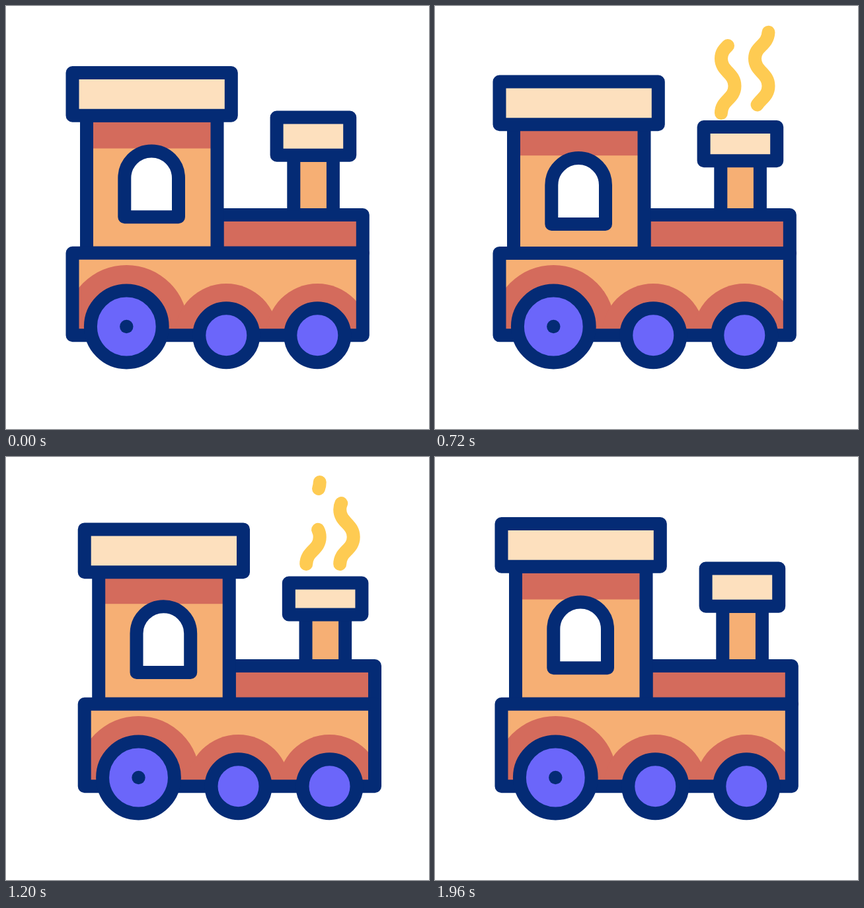
Recreate the animation shown at these times as an HTML page. Size 640 px wide and 640 px high, loop 2 s.

```html
<!DOCTYPE html>
<html lang="en">
<head>
<meta charset="utf-8">
<title>Toy train</title>
<style>
  html, body { margin: 0; height: 100%; overflow: hidden; background: #fff; }
  svg { display: block; width: 100%; height: 100%; }
  .line { stroke: #042b75; stroke-width: 20; stroke-linejoin: round; }
  .smoke { fill: none; stroke: #fecb52; stroke-width: 20; stroke-linecap: round; }
  .orange { fill: #f6af74; }
  .red { fill: #d46b5c; }
  .cream { fill: #fde0be; }
  .wheel { fill: #6b66fa; }
</style>
</head>
<body>
<svg viewBox="0 0 640 640">
  <clipPath id="hull"><rect x="100.5" y="373.8" width="439.3" height="124.4"/></clipPath>
  <g id="train">
    <g id="body">
      <path id="left" class="smoke" pathLength="100" d="M436 162C436 142 456.500 141 456.500 121S436 99 436 79.500S456.500 60 456.500 38"/>
      <path id="right" class="smoke" pathLength="100" d="M487 162C487 142 507.500 141 507.500 121S487 99 487 79.500S507.500 60 507.500 38"/>
      <rect class="line orange" x="435.3" y="226" width="59.6" height="90"/>
      <rect id="cap" class="line cream" x="409.6" width="110.600"/>
      <rect class="line red" x="319.5" y="316" width="220.3" height="57.8"/>
      <rect class="orange" x="122" y="166" width="197.5" height="208"/>
      <rect id="band" class="red" x="122" y="166" width="197.5"/>
      <rect class="line" fill="none" x="122" y="166" width="197.5" height="207.8"/>
      <path id="window" class="line" fill="#fff" d="M179.300 319.300V260.300a40.850 40.850 0 0 1 81.700 0V319.300Z"/>
      <rect id="roof" class="line cream" x="100.5" y="101" width="240.3" height="64.8"/>
      <g clip-path="url(#hull)">
        <rect class="orange" x="100" y="373" width="440" height="126"/>
        <g id="arches" class="red">
          <circle cx="182.3" cy="485" r="93"/>
          <circle cx="333.3" cy="498" r="78"/>
          <circle cx="471.3" cy="498" r="78"/>
        </g>
      </g>
      <rect class="line" fill="none" x="100.5" y="373.8" width="439.3" height="124.4"/>
    </g>
    <g class="line wheel">
      <circle cx="182.3" cy="485" r="54.4"/>
      <circle cx="333.3" cy="498.2" r="41"/>
      <circle cx="471.3" cy="498.2" r="41"/>
    </g>
    <circle cx="182.3" cy="485" r="10.2" fill="#042b75"/>
  </g>
</svg>
<script>
const el = id => document.getElementById(id);
const move = (id, x, y) => el(id).setAttribute('transform', `translate(${x} ${y})`);
const ease = u => (1 - Math.cos(Math.PI * Math.min(1, Math.max(0, u)))) / 2;

// Eased value between [time, value] keys
function keyed(t, keys) {
  let v = keys[0][1];
  for (let i = 1; i < keys.length; i++) {
    const [t0, a] = keys[i - 1], [t1, b] = keys[i];
    v += (b - a) * ease((t - t0) / (t1 - t0));
  }
  return v;
}

// Repeated dips between 200 and 1800 ms
const dip = (t, period) =>
  t < 200 || t > 1800 ? 0 : Math.sin(Math.PI * (t - 200) / period) ** 2;

const SWAY = [[140, 0], [495, -13], [1091, 19], [1926, 0]];
const BOB = [[180, 0], [440, 4.6], [700, 0], [920, 5.6], [1180, 0], [1620, 9], [1800, 0]];
const PUFF = 640, DRAW = 570, FADE = 420;

// Each wisp grows from the chimney, then its tail follows; two puffs per loop
function smoke(id, t, start) {
  const dashes = [];
  let pos = 0;
  for (const s of [start + PUFF, start]) {
    const head = 100 * ease((t - s) / DRAW);
    const tail = 100 * ease((t - s - FADE) / DRAW);
    if (head - tail > 0.01) {
      dashes.push([tail, head]);
    }
  }
  const path = el(id);
  path.style.display = dashes.length ? '' : 'none';
  if (!dashes.length) return;
  const first = dashes[0][0];
  pos = first;
  const pattern = [];
  for (const [tail, head] of dashes) {
    if (pattern.length) pattern.push(tail - pos);
    pattern.push(head - tail);
    pos = head;
  }
  pattern.push(300);
  path.setAttribute('stroke-dasharray', pattern.join(' '));
  path.setAttribute('stroke-dashoffset', -first);
}

function draw(now) {
  const t = Math.floor(now % 2000 / 40) * 40;
  const bob = keyed(t, BOB), slow = dip(t, 800), press = 22 * dip(t, 400);
  move('train', keyed(t, SWAY), 0);
  move('body', 0, bob);
  move('arches', 0, -bob);
  move('roof', 0, 16.8 * slow);
  move('window', 0, 13.3 * slow);
  el('band').setAttribute('height', 49.5 + 13.3 * slow + 0.42 * bob);
  el('cap').setAttribute('y', 168.5 + press);
  el('cap').setAttribute('height', 57.2 - 0.42 * press);
  smoke('right', t, 187);
  smoke('left', t, 307);
}

const begin = performance.now();
function tick() {
  draw(performance.now() - begin);
  requestAnimationFrame(tick);
}
tick();
</script>
</body>
</html>
```
